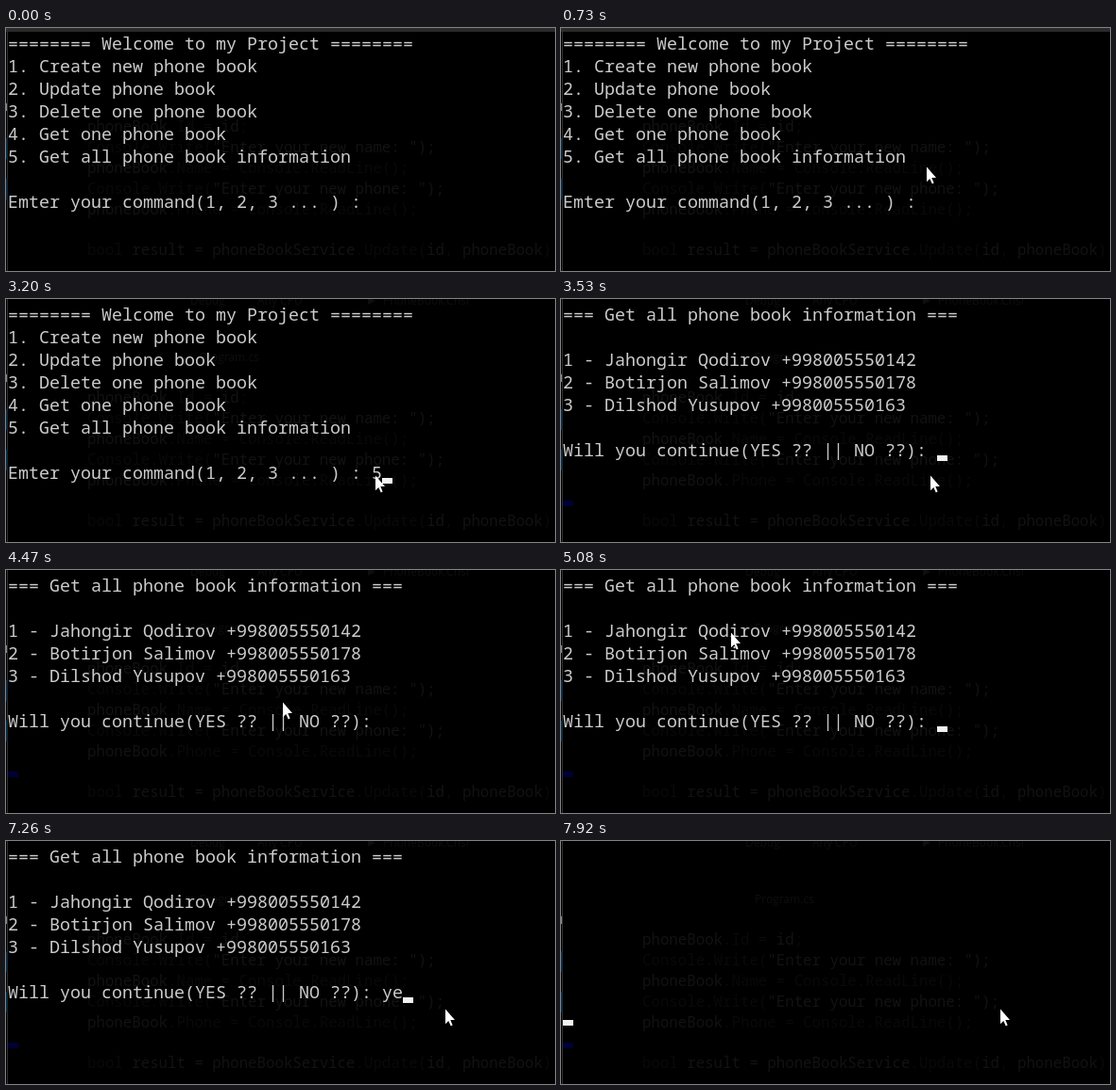
An HTML page that plays this animation: 581x258 px, repeating every 7990 ms.

```html
<!DOCTYPE html>
<html lang="en">
<head>
<meta charset="utf-8">
<title>Phone book console</title>
<style>
  html, body { margin: 0; width: 100%; height: 100%; overflow: hidden; background: #000; }
  svg { display: block; width: 581px; height: 258px; }
  text { white-space: pre; font-family: "Noto Sans Mono", "DejaVu Sans Mono", monospace; }
  .con { font-size: 18.333px; fill: #ccc; }
  .code { font-size: 15.75px; fill: #090909; }
  .code tspan { fill: #121212; }
  .ui { font: 12px "Open Sans", sans-serif; fill: #0e0e0e; }
</style>
</head>
<body>
<svg viewBox="0 0 581 258">
  <rect width="581" height="258"/>
  <g id="code"></g>
  <g id="bar">
    <text class="ui" x="195" y="6">Debug</text>
    <text class="ui" x="266" y="6">Any CPU</text>
    <path d="M383 -2l8 4-8 4z" fill="#0e0e0e"/>
    <text class="ui" x="399" y="6">PhoneBook.Cnsl</text>
    <text class="ui" x="205" y="66">Program.cs</text>
  </g>
  <rect id="strip" width="581" height="4" fill="#2a2a2a"/>
  <rect x="1" width="1" height="258" fill="#303030"/>
  <path d="M0 117h2v22h-2zM0 160h2v22h-2z" fill="#0b2a40"/>
  <rect y="80" width="1" height="8" fill="#888"/>
  <rect id="mark" x="2" y="214" width="11" height="6" fill="#000034"/>
  <g id="screen"></g>
  <rect id="caret" width="11" height="6" fill="#f2f2f2"/>
  <circle id="click" cx="390" cy="187" r="12" fill="#807a00"/>
  <path id="mouse" d="M1 .5V16.2L4.3 13 6.8 18.4 8.6 17.6 6.3 12.1H11z" fill="#fff"/>
</svg>
<script>
const LOOP = 7990, CLICK = 1460, UNCLICK = 1720, FOCUS = 1590;
const ENTER = 3460, INFO = 3530, CLEAR = 7920;
const BLINK = 530, TICK = 69;
const $ = id => document.getElementById(id);

const menu = `======== Welcome to my Project ========
1. Create new phone book
2. Update phone book
3. Delete one phone book
4. Get one phone book
5. Get all phone book information

Emter your command(1, 2, 3 ... ) : `;

const info = `=== Get all phone book information ===

1 - Jahongir Qodirov +998005550142
2 - Botirjon Salimov +998005550178
3 - Dilshod Yusupov +998005550163

Will you continue(YES ?? || NO ??): `;

const code = `phoneBook.Id = id;
Console.Write("Enter your new name: ");
phoneBook.Name = Console.ReadLine();
Console.Write("Enter your new phone: ");
phoneBook.Phone = Console.ReadLine();

bool result = phoneBookService.Update(id, phoneBook);`;

// key presses and mouse waypoints by time
const keys = [[3130, "5"], [ENTER, "\n"], [7120, "y"], [7260, "e"], [7460, "s"], [7850, "\n"]];
const path = [
  [150, 380, 262], [600, 386, 142], [1130, 390, 187], [4120, 390, 187], [4950, 151, 72],
  [5080, 179, 66], [5360, 220, 4], [5770, 315, 136], [5840, 363, 187], [6170, 464, 178]
];

const textLines = (cls, lines, x, y, pitch) => lines.map((s, i) =>
  `<text class="${cls}" x="${x}" y="${y + i * pitch}">${s}</text>`).join("");
const show = (id, on) => $(id).style.display = on ? "" : "none";

$("code").innerHTML = textLines("code", code.replace(
  /phoneBook\w*|\bid\b|result =|"[^"]*"\);/g, "<tspan>$&</tspan>").split("\n"), 86, 110, 21.9);

function mousePos(t) {
  const q = 43 + TICK * Math.floor((t - 43) / TICK);
  const i = path.findIndex(p => p[0] > q);
  if (i < 1) return path.at(i).slice(1);   // before the first or after the last point
  const a = path[i - 1], b = path[i], u = (q - a[0]) / (b[0] - a[0]);
  return [1, 2].map(k => Math.round(a[k] + (b[k] - a[k]) * u));
}

function caretOn(t, lastKey) {
  const phase = t < ENTER ? t - FOCUS : t - ENTER - 780;
  return t >= FOCUS && (t - lastKey < 400 || Math.floor(phase / BLINK) % 2 !== 0);
}

let shown;
function draw(t) {
  const began = t < INFO ? 0 : INFO;
  const pressed = keys.filter(([at]) => at >= began && at <= t);
  const lines = ((began ? info : menu) + pressed.map(k => k[1]).join("")).split("\n");

  const html = t < CLEAR ? textLines("con", lines, 2, 23, 24) : "";
  if (html !== shown) $("screen").innerHTML = shown = html;

  show("strip", t < CLICK);
  show("bar", t >= CLICK);
  show("click", t >= CLICK && t < UNCLICK);
  show("mark", began);

  const lastKey = Math.max(began, ...pressed.map(k => k[0]));
  show("caret", caretOn(t, lastKey));
  $("caret").setAttribute("x", 2 + 11 * lines.at(-1).length);
  $("caret").setAttribute("y", 22 + 24 * (lines.length - 1));
  $("mouse").setAttribute("transform", `translate(${mousePos(t)})`);
}

const start = performance.now();
function tick() {
  draw((performance.now() - start) % LOOP);
  requestAnimationFrame(tick);
}
tick();
</script>
</body>
</html>
```
